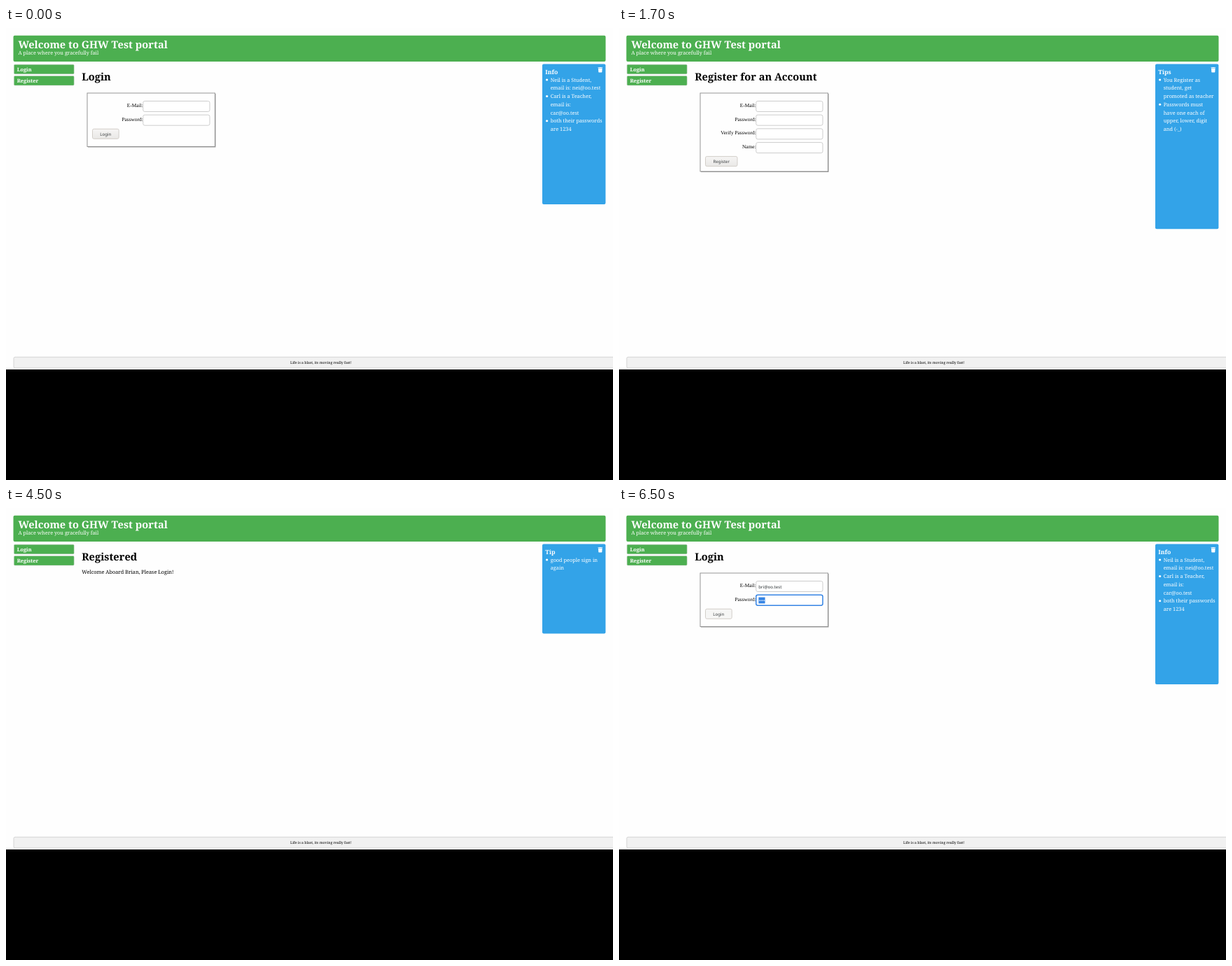
These frames come from a looping animation (867x646 px, 8 s). An HTML page:

```html
<!DOCTYPE html>
<html lang="en">
<head>
<meta charset="utf-8">
<title>Quiz pages</title>
<style>
html, body { margin: 0; width: 100%; height: 100%; overflow: hidden; background: #000; }
svg { display: block; width: 100vw; height: 100vh; }
text { text-rendering: geometricPrecision; white-space: pre; }
.serif { font-family: "Noto Serif", serif; }
.label { font-family: "Liberation Serif", serif; text-anchor: end; }
.sans { font-family: "Noto Sans", sans-serif; }
</style>
</head>
<body>
<svg id="stage" viewBox="0 0 867 646" preserveAspectRatio="none">
  <defs>
    <linearGradient id="face" x1="0" y1="0" x2="0" y2="1">
      <stop offset="0" stop-color="#f6f5f4"/>
      <stop offset="1" stop-color="#e9e8e6"/>
    </linearGradient>
  </defs>
</svg>
<script>
const stage = document.getElementById('stage');
const GREEN = '#4caf50', BLUE = '#33a3e8', FOCUS = '#3584e4';
const BIN = 'M1 4H13L12.4 14.6A1.5 1.5 0 0 1 10.9 16H3.1A1.5 1.5 0 0 1 1.6 14.6Z' +
  'M.5 1H4.2L4.8 0H9.2L9.8 1H13.5A.5 .5 0 0 1 14 1.5V3H0V1.5A.5 .5 0 0 1 .5 1Z';

function add(parent, tag, attrs, content) {
  const el = document.createElementNS('http://www.w3.org/2000/svg', tag);
  for (const key in attrs) el.setAttribute(key, attrs[key]);
  if (content) el.textContent = content;
  parent.appendChild(el);
  return el;
}

// Box given by its left, top, right and bottom edges.
function box(g, x, y, right, bottom, fill, extra = {}) {
  return add(g, 'rect', { x, y, width: right - x, height: bottom - y, fill, ...extra });
}

function text(g, content, x, y, size, cls = 'serif', extra = {}) {
  return add(g, 'text', { x, y, 'font-size': size, class: cls, ...extra }, content);
}

const wide = {
  em: 7.33, line: 11.75, paper: [867, 488], bg: '#fefefe',
  header: [10.5, 10.8, 856.5, 48], headerText: 17.4, titleY: 29.1, subY: 38.2,
  titleLines: ['Welcome to GHW Test portal'],
  nav: [11.4, 97.2], navTop: 52.2, navHeight: 13.6, navStep: 16.3, navX: 15.7, navBase: 9.5,
  head: [108.2, 75.3],
  form: [116, 93, 298.5], shadow: 1, field: [195.8, 104.5, 291, 15], step: 19.7,
  labelY: 112.9, buttonX: 123.5, buttonHeight: 14, radius: 2,
  panel: [766, 51.5, 856.4], panelText: [770.3, 65.7], bullet: [772.6, 74, 1.6],
  item: [777.7, 76.7], bin: [845.5, 55.9, .47],
  footer: [11, 470.3, 880, 486], footText: [406, 479.8]
};

const narrow = {
  em: 11.68, line: 18.67, paper: [374.4, 646], bg: '#fff',
  header: [17, 17.2, 357, 95.4], headerText: 28, titleY: 46.9, subY: 79.8,
  titleLines: ['Welcome to GHW Test', 'portal'],
  nav: [18, 356.5], navTop: 101.8, navHeight: 22, navStep: 26, navX: 25, navBase: 16.2,
  head: [21.6, 194.3],
  form: [33.5, 222.5, 326], shadow: 1.6, field: [161.5, 240.8, 314, 24], step: 31.6,
  labelY: 254.6, buttonX: 45.5, buttonHeight: 22, radius: 3.5,
  panel: [17, 423.5, 357], panelText: [24, 445.2], bullet: [27.6, 459.5, 2.7],
  item: [36, 463.1], bin: [339.3, 430.4, .75],
  footer: [17.5, 617.5, 390, 642.5], footText: [143, 633]
};

const login = {
  layout: wide, title: 'Login', labels: ['E-Mail:', 'Password:'],
  formBottom: 169.5, button: ['Login', 144.3, 161.2],
  panelBottom: 252, tip: 'Info',
  tips: [
    ['Neil is a Student,', 'email is: nei@oo.test'],
    ['Carl is a Teacher,', 'email is:', 'car@oo.test'],
    ['both their passwords', 'are 1234']
  ]
};

const register = {
  layout: wide, title: 'Register for an Account',
  labels: ['E-Mail:', 'Password:', 'Verify Password:', 'Name:'],
  formBottom: 205, button: ['Register', 183.6, 169],
  panelBottom: 287.2, tip: 'Tips',
  tips: [
    ['You Register as', 'student, get', 'promoted as teacher'],
    ['Passwords must', 'have one each of', 'upper, lower, digit', 'and (-_)']
  ]
};

const scenes = [
  { ...login, end: 500 },
  { ...register, end: 2500 },
  {
    ...register, end: 4500, layout: narrow, formBottom: 401.5,
    button: ['Register', 367.5, 119], panelBottom: 513,
    tips: [
      ['You Register as student, get promoted as teacher'],
      ['Passwords must have one each of upper, lower, digit and', '(-_)']
    ]
  },
  {
    layout: wide, end: 6500, title: 'Registered', message: 'Welcome Aboard Brian, Please Login!',
    panelBottom: 179.5, tip: 'Tip', tips: [['good people sign in', 'again']]
  },
  { ...login, end: 8000, filled: true }
];

function drawHeader(g, L) {
  box(g, ...L.header, GREEN, { rx: L.radius });
  const white = { fill: '#fff' };
  L.titleLines.forEach((line, i) =>
    text(g, line, L.headerText, L.titleY + i * L.line, L.em * 2, 'serif', { ...white, 'font-weight': 700 }));
  text(g, 'A place where you gracefully fail', L.headerText, L.subY, L.em, 'serif', white);
  ['Login', 'Register'].forEach((name, i) => {
    const y = L.navTop + i * L.navStep;
    box(g, L.nav[0], y, L.nav[1], y + L.navHeight, GREEN,
      { rx: L.radius * .7, stroke: '#ccc', 'stroke-opacity': .55, 'stroke-width': .8 });
    text(g, name, L.navX, y + L.navBase, L.em, 'serif', { ...white, 'font-weight': 700 });
  });
}

function drawForm(g, scene) {
  const L = scene.layout, [x, y, right] = L.form, s = L.shadow;
  box(g, x + s, y + s, right + s, scene.formBottom + s, '#999');
  box(g, x, y, right, scene.formBottom, L.bg, { stroke: '#8a8a8a', 'stroke-width': .9 });

  const [fx, fy, fRight, fHeight] = L.field;
  scene.labels.forEach((name, i) => {
    const top = fy + i * L.step, focused = scene.filled && i === 1;
    text(g, name, fx - .2, L.labelY + i * L.step, L.em, 'label');
    box(g, fx, top, fRight, top + fHeight, '#fff', {
      rx: L.radius * 1.2, stroke: focused ? FOCUS : '#cdcdcd', 'stroke-width': focused ? 1.5 : 1
    });
  });

  const [caption, top, bRight] = scene.button, size = L.em * 5 / 6;
  box(g, L.buttonX, top, bRight, top + L.buttonHeight, scene.filled ? '#f6f6f5' : 'url(#face)',
    { rx: L.radius, stroke: '#cfcac5', 'stroke-width': .9 });
  text(g, caption, (L.buttonX + bRight) / 2, top + L.buttonHeight / 2 + size * .37, size, 'sans',
    { fill: '#3c4042', 'text-anchor': 'middle' });

  if (scene.filled) {
    text(g, 'bri@oo.test', 199.3, 114.7, size, 'sans', { fill: '#2e3436' });
    box(g, 199.4, 127.6, 208.6, 136.4, FOCUS);
    for (let i = 0; i < 4; i++) add(g, 'circle', { cx: 200.8 + i * 2.2, cy: 132.2, r: .75, fill: '#fff' });
  }
}

function drawPanel(g, scene) {
  const L = scene.layout, [bx, by, r] = L.bullet, [tx, ty] = L.item, [ix, iy, k] = L.bin;
  box(g, ...L.panel, scene.panelBottom, BLUE, { rx: L.radius });
  add(g, 'path', { d: BIN, fill: '#fff', transform: `translate(${ix} ${iy}) scale(${k})` });
  text(g, scene.tip, ...L.panelText, L.em * 1.17, 'serif', { fill: '#fff', 'font-weight': 700 });
  let row = 0;
  for (const lines of scene.tips) {
    add(g, 'circle', { cx: bx, cy: by + row * L.line, r, fill: '#fff' });
    for (const line of lines) text(g, line, tx, ty + row++ * L.line, L.em, 'serif', { fill: '#fff' });
  }
}

function drawScene(scene) {
  const L = scene.layout, g = add(stage, 'g', { display: 'none' }), [w, h] = L.paper;
  box(g, 0, 0, w, h, L.bg);
  drawHeader(g, L);
  text(g, scene.title, ...L.head, L.em * 2, 'serif', { 'font-weight': 700 });
  if (scene.labels) drawForm(g, scene);
  if (scene.message) text(g, scene.message, 108.3, 93.8, L.em);
  drawPanel(g, scene);
  box(g, ...L.footer, '#f1f1f1', { rx: L.radius, stroke: '#d2d2d2', 'stroke-width': .9 });
  text(g, 'Life is a blast, its moving really fast!', ...L.footText, L.em * .7);
  if (w < 867) box(g, w, 0, 867, 646, '#000');
  if (h < 646) box(g, 0, h, 867, 646, '#000');
  return g;
}

const groups = scenes.map(drawScene);
const start = performance.now();

function render(time) {
  const t = time % 8000, current = scenes.findIndex(scene => t < scene.end);
  groups.forEach((g, i) => g.setAttribute('display', i === current ? 'inline' : 'none'));
}

function tick() {
  render(performance.now() - start);
  requestAnimationFrame(tick);
}
tick();
</script>
</body>
</html>
```
